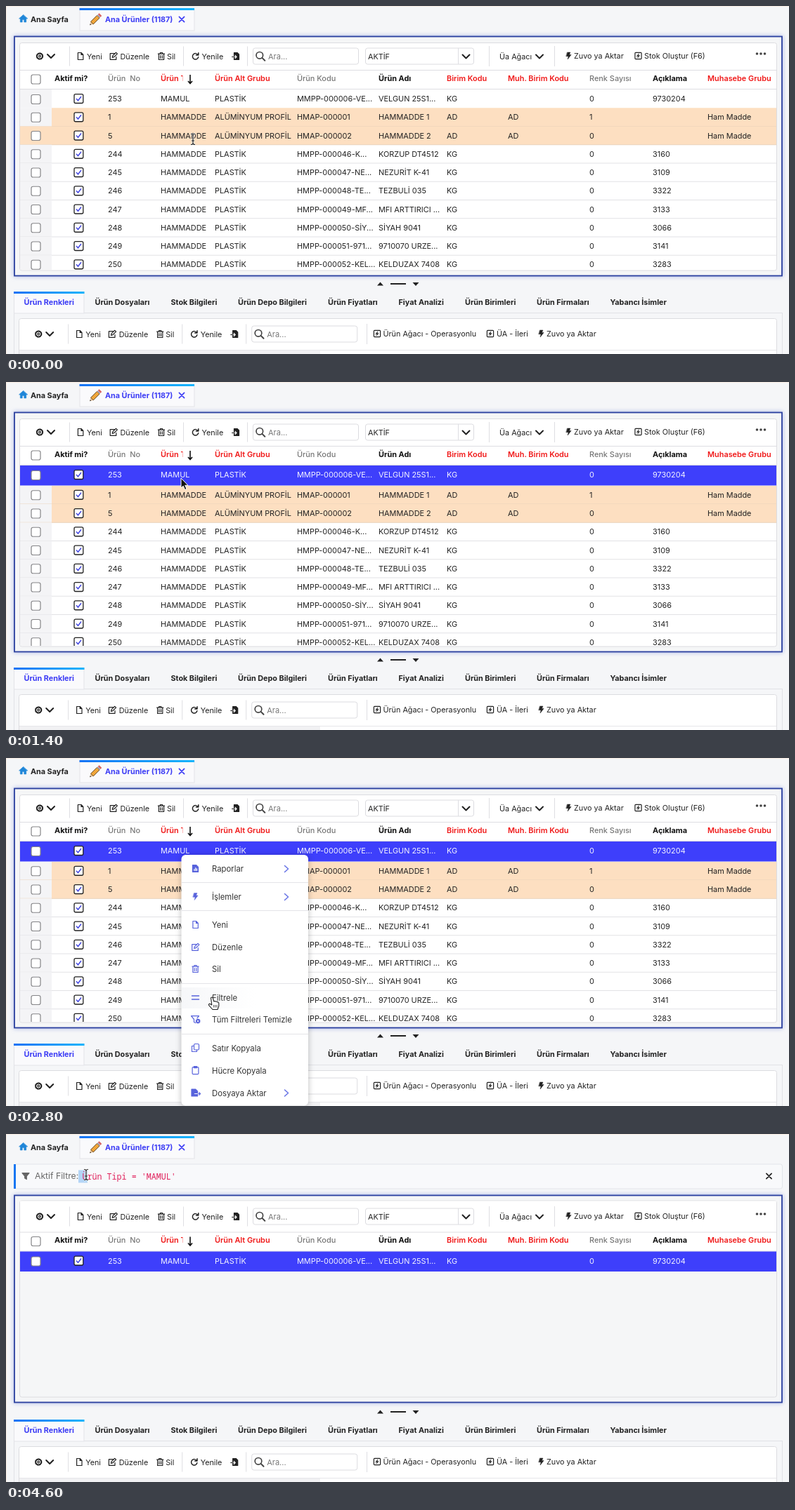
An HTML page that plays this animation: 1114x496 px, repeating every 4800 ms.

```html
<!DOCTYPE html>
<html lang="tr">
<head>
<meta charset="utf-8">
<title>Ana Ürünler</title>
<style>
html, body { margin: 0; width: 100%; height: 100%; overflow: hidden; background: #f5f6f8; }
svg { display: block; width: 1114px; height: 496px; }
text { font: 10.9px Inter, sans-serif; fill: #222; white-space: pre; }
.tb { font-size: 10.8px; }
.b { font-size: 10.8px; font-weight: 650; }
.hd { font-weight: 500; fill: #777; }
.red { font-weight: 600; fill: #f01818; }
.blk { font-weight: 650; fill: #111; }
.blue { fill: #3d3df5; }
.menu { font-size: 11.3px; fill: #333; }
.hint { font-size: 11px; fill: #777; }
.label { font-size: 12.2px; fill: #666; }
.mono { font: 11.7px "Noto Sans Mono", monospace; fill: #e0225c; }
.ic { fill: none; stroke: currentColor; stroke-width: 1.2; stroke-linecap: round; stroke-linejoin: round; }
.ic .f { fill: currentColor; }
.sep { stroke: #dedee2; }

.anim { animation: 4800ms step-end infinite; }
.full { animation-name: full; }
.filtered { animation-name: filtered; }
.tools { animation-name: tools; }
.head { animation-name: head; }
.rest { animation-name: rest; }
.row0 { animation-name: row0; }
.ink0 text { animation: ink0 4800ms step-end infinite; }
.side1 { animation-name: side1; }
.side5 { animation-name: side5; }
.popup { animation-name: popup; }
.hover { animation-name: hover; }
.mark { animation-name: mark; }
.pointer { animation-name: pointer; }
.arrow { animation-name: arrow; }
.hand { animation-name: hand; }
.beam { animation-name: beam; }
@keyframes full { 0% { visibility: visible } 66.666%, 100% { visibility: hidden } }
@keyframes filtered { 0% { visibility: hidden } 66.666%, 100% { visibility: visible } }
@keyframes tools { 0% { transform: none } 66.666%, 100% { transform: translate(0, 46px) } }
@keyframes head { 0% { transform: none } 66.666%, 100% { transform: translate(0, 48.5px) } }
@keyframes rest { 0% { transform: none } 29.166%, 100% { transform: translate(0, 2.5px) } }
@keyframes row0 {
  0% { fill: transparent; height: 26px }
  8.333% { fill: #e7e8ea; height: 26px }
  29.166%, 100% { fill: #3e3ffb; height: 28.5px }
}
@keyframes ink0 { 0% { fill: #222 } 29.166%, 100% { fill: #f4f4ff } }
@keyframes side1 { 0% { visibility: hidden } 4.166% { visibility: visible } 8.333%, 100% { visibility: hidden } }
@keyframes side5 { 0% { visibility: visible } 4.166%, 100% { visibility: hidden } }
@keyframes popup { 0% { visibility: hidden } 33.333% { visibility: visible } 66.666%, 100% { visibility: hidden } }
@keyframes hover {
  0% { transform: translate(0, -112px) }
  37.5% { transform: translate(0, -32px) }
  45.833% { transform: none }
  50% { transform: translate(0, 31px) }
  54.166%, 100% { transform: translate(0, 72px) }
}
@keyframes mark { 0% { visibility: hidden } 95.833%, 100% { visibility: visible } }
@keyframes pointer {
  0% { transform: translate(266px, 190px) }
  4.166% { transform: translate(258px, 160px) }
  8.333% { transform: translate(249px, 137px) }
  37.5% { transform: translate(266px, 242px) }
  45.833% { transform: translate(275px, 265px) }
  50% { transform: translate(281px, 297px) }
  54.166% { transform: translate(290px, 334px) }
  58.333% { transform: translate(293px, 341px) }
  66.666% { transform: translate(292px, 341px) }
  70.833% { transform: translate(250px, 258px) }
  75% { transform: translate(182px, 160px) }
  79.166% { transform: translate(130px, 95px) }
  83.333% { transform: translate(122px, 80px) }
  87.5% { transform: translate(117px, 71px) }
  91.666% { transform: translate(103px, 58px) }
  95.833%, 100% { transform: translate(114px, 58px) }
}
@keyframes arrow {
  0% { visibility: hidden } 8.333% { visibility: visible } 37.5% { visibility: hidden }
  66.666% { visibility: visible } 91.666%, 100% { visibility: hidden }
}
@keyframes hand { 0% { visibility: hidden } 37.5% { visibility: visible } 66.666%, 100% { visibility: hidden } }
@keyframes beam { 0% { visibility: visible } 8.333% { visibility: hidden } 91.666%, 100% { visibility: visible } }
</style>
</head>
<body>
<svg id="stage" viewBox="0 0 1114 496"></svg>
<script>
const icons = {
  gear: '<circle r="4.3" stroke-width="1.7" stroke-dasharray="2 1.38"/><circle r="3.7"/><circle r="1.4"/>',
  down: '<path d="M-5 -2.5 0 2.5 5 -2.5" stroke-width="2"/>',
  right: '<path d="M-2.5 -4.5 2.5 0 -2.5 4.5" stroke-width="1.6"/>',
  file: '<path d="M-3.6 -5H1L3.8 -2V5H-3.6ZM1 -5V-2H3.8"/>',
  edit: '<path d="M1 -3.8H-4.8V4.8H3.8V1M-1.8 1.8 -1.2 -.6 3.6 -5.2 5.4 -3.4 .6 1.2Z"/>',
  trash: '<path d="M-4.6 -3.4H4.6M-1.6 -3.4V-5H1.6V-3.4M-3.6 -3.4V5H3.6V-3.4M-1.3 -1V3M1.3 -1V3"/>',
  refresh: '<path d="M3.6 -2A4.2 4.2 0 1 0 4.2 1.2M4.3 -4.8V-1.6H1" stroke-width="1.5"/>',
  export: '<path class="f" d="M-2.5 -5H2L4.5 -2.5V5H-2.5Z"/><path d="M-5 1H1M-1 -1 1 1 -1 3" stroke="#fff"/><path d="M-5.4 1H-3"/>',
  search: '<circle cx="-1.2" cy="-1.2" r="4.8" stroke-width="1.7"/><path d="M2.4 2.4 6.3 6.3" stroke-width="2"/>',
  bolt: '<path class="f" d="M-1.8 -5H2.4L1 -1.5H3.6L-1.4 5 -.4 .7H-3.4Z" stroke-width=".5"/>',
  boltBox: '<rect x="-4.6" y="-4.6" width="9.2" height="9.2" rx="1"/><path class="f" d="M.8 -3 -2.2 .6H0L-.8 3 2.2 -.6H0Z" stroke-width=".5"/>',
  home: '<path class="f" d="M0 -5.4 -6 0H-4.2V5H-1.3V1.6H1.3V5H4.2V0H6Z" stroke-width=".6"/>',
  close: '<path d="M-3.6 -3.6 3.6 3.6M3.6 -3.6 -3.6 3.6" stroke-width="1.7"/>',
  funnel: '<path class="f" d="M-5 -4.4H5L1.3 .2V4.6L-1.3 3V.2Z"/>',
  report: '<path class="f" d="M-4 -5H1L4 -2V5H-4Z"/><path d="M-1.6 3V1M.2 3V-1M2 3V.4" stroke="#fff"/>',
  equals: '<path d="M-5 -2.6H5M-5 2.6H5" stroke-width="1.5"/>',
  unfilter: '<path d="M5 -4.8H-6L-2 0V4L0 5M5 -4.8 2.4 -1.6"/><circle class="f" cx="3.6" cy="2.6" r="2.7"/><path d="M2.6 1.6 4.6 3.6M4.6 1.6 2.6 3.6" stroke="#fff" stroke-width=".9"/>',
  copy: '<rect x="-2" y="-5.5" width="7" height="8.5" rx="1.5"/><path d="M-2 -2.5H-5V5.5H2V3"/>',
  paste: '<rect x="-4.4" y="-4.4" width="8.8" height="10" rx="1.2"/><path d="M-2 -5.4H2V-3.4H-2Z"/>',
  send: '<path class="f" d="M-5.5 -5H0L3 -2V5H-5.5Z"/><path d="M-1 1.5H2.8" stroke="#fff"/><path d="M4 1.5H7M5.2 -.4 7 1.5 5.2 3.4"/>'
};
const icon = (name, x, y, color = '#222') =>
  `<g class="ic" color="${color}" transform="translate(${x} ${y})">${icons[name]}</g>`;
const text = (x, y, s, cls = '') => `<text x="${x}" y="${y + 4}" class="${cls}">${s}</text>`;
const rect = (x, y, w, h, fill, more = '') =>
  `<rect x="${x}" y="${y}" width="${w}" height="${h}" fill="${fill}" ${more}/>`;
const line = (d, color = '#dedee2') => `<path d="${d}" fill="none" stroke="${color}"/>`;
const group = (cls, ...parts) => `<g class="${cls}">${parts.join('')}</g>`;
const box = (x, y, w, h, fill = '#fff', color = '#dcdce0') => rect(x, y, w, h, fill, `stroke="${color}" rx="3"`);
const emptyBox = y => rect(36, y - 6, 13, 13, '#fff', 'stroke="#858588" stroke-width="1.2" rx="2.5"');
const tickBox = y => rect(97, y - 6.3, 12.8, 12.8, '#fff', 'stroke="#222" stroke-width="1.3" rx="2"') +
  `<path d="M100 ${y} 102.5 ${y + 2.8} 107 ${y - 3}" fill="none" stroke="#3f43e0" stroke-width="1.4"/>`;

// Buttons shared by both toolbars
const buttons = (dx, y) => icon('gear', 48 + dx, y) + icon('down', 64 + dx, y) +
  icon('file', 106 + dx, y) + text(115 + dx, y, 'Yeni', 'tb') +
  icon('edit', 153 + dx, y) + text(162.5 + dx, y, 'Düzenle', 'tb') +
  icon('trash', 221 + dx, y) + text(229 + dx, y, 'Sil', 'tb') +
  icon('refresh', 269.5 + dx, y) + text(278.5 + dx, y, 'Yenile', 'tb') +
  icon('export', 327 + dx, y) +
  [90.5, 252.5, 343.5].map(x => line(`M${x + dx} ${y - 14}V${y + 14}`)).join('') +
  box(351.5 + dx, y - 11.5, 150, 23) + icon('search', 362 + dx, y, '#444') + text(373 + dx, y, 'Ara...', 'hint');

const frame = (y, h) =>
  rect(12, y, 1092, h, '#f5f6f7', 'stroke="#2b409f" stroke-width="1.8" style="filter:drop-shadow(0 0 3px #6f86d899)"');

const columns = [
  [69, 'Aktif mi?', 'blk'], [145, 'Ürün\u00a0 No', 'hd'], [297, 'Ürün Alt Grubu', 'red'], [414, 'Ürün Kodu', 'hd'],
  [530, 'Ürün Adı', 'blk'], [627, 'Birim Kodu', 'red'], [714, 'Muh. Birim Kodu', 'red'],
  [830, 'Renk Sayısı', 'hd'], [920, 'Açıklama', 'blk'], [998, 'Muhasebe Grubu', 'red']
];
const fields = [145, 220, 297, 414, 530, 627, 830, 920];
const plastic = (no, code, name, note, type = 'HAMMADDE') => [no, type, 'PLASTİK', code, name, 'KG', 0, note];
const alloy = (no, n, colors) => [no, 'HAMMADDE', 'ALÜMİNYUM PROFİL', 'HMAP-00000' + n, 'HAMMADDE ' + n, 'AD', colors, ''];
const rows = [
  plastic(253, 'MMPP-000006-VE...', 'VELGUN 25S1...', 9730204, 'MAMUL'),
  alloy(1, 1, 1),
  alloy(5, 2, 0),
  plastic(244, 'HMPP-000046-K...', 'KORZUP DT4512', 3160),
  plastic(245, 'HMPP-000047-NE...', 'NEZURİT K-41', 3109),
  plastic(246, 'HMPP-000048-TE...', 'TEZBULİ 035', 3322),
  plastic(247, 'HMPP-000049-MF...', 'MFI ARTTIRICI ...', 3133),
  plastic(248, 'HMPP-000050-SİY...', 'SİYAH 9041', 3066),
  plastic(249, 'HMPP-000051-971...', '9710070 URZE...', 3141),
  plastic(250, 'HMPP-000052-KEL...', 'KELDUZAX 7408', 3283)
];
const pitch = 26.25;
const cells = (row, y) => row.map((v, i) => text(fields[i], y, v)).join('');

const drawRow = (row, i) => {
  const y = 132 + pitch * i, top = y - 13;
  const tinted = i === 1 || i === 2;
  return (tinted ? rect(65, top, 1031, pitch, '#fddfc1') : '') +
    rect(20, top, 45, pitch, '#f4f4f6') +
    (tinted ? rect(20, top, 45, pitch, '#fddfc1', `class="anim side${row[0]}"`) : '') +
    line(`M20 ${top + pitch}H1096`, tinted ? '#e9d2ba' : '#e2e2e5') +
    emptyBox(y) + tickBox(y) + cells(row, y) +
    (tinted ? text(714, y, 'AD') + text(998, y, 'Ham Madde') : '');
};

const tabs = [[126.5, 'Ürün Dosyaları'], [234.5, 'Stok Bilgileri'], [330, 'Ürün Depo Bilgileri'], [458, 'Ürün Fiyatları'],
  [558.5, 'Fiyat Analizi'], [653, 'Ürün Birimleri'], [755, 'Ürün Firmaları'], [859.5, 'Yabancı İsimler']];

const menu = [[158, 'report', 'Raporlar', 1], [198, 'bolt', 'İşlemler', 1], [238, 'file', 'Yeni'], [270, 'edit', 'Düzenle'],
  [301, 'trash', 'Sil'], [342, 'equals', 'Filtrele'], [373, 'unfilter', 'Tüm Filtreleri Temizle'],
  [413.5, 'copy', 'Satır Kopyala'], [445.5, 'paste', 'Hücre Kopyala'], [477.5, 'send', 'Dosyaya Aktar', 1]];

const defs = `<defs>
  <linearGradient id="bar"><stop stop-color="#1673f5"/><stop offset="1" stop-color="#16b4fb"/></linearGradient>
  <linearGradient id="fade"><stop stop-color="#f6f7f9"/><stop offset="1" stop-color="#fff"/></linearGradient>
  <clipPath id="body"><rect x="20" y="119" width="1076" height="257"/></clipPath>
  <clipPath id="type"><rect x="215" y="90" width="36.5" height="26"/></clipPath>
</defs>`;

const topTabs = rect(0, 0, 1114, 496, '#f5f6f8') + line('M0 .5H1114M.5 0V496', '#f8ece2') +
  icon('home', 24.5, 18, '#1f86d8') + text(35, 18.5, 'Ana Sayfa', 'b') +
  rect(105, 4, 163, 31, '#fafafc', 'stroke="#e3e3e8"') + rect(104.5, 3, 163.5, 3, 'url(#bar)') +
  `<g transform="translate(127 19.5) rotate(-45)"><path d="M-11 0 -6.5 -2.6V2.6Z" fill="#e8c49a"/>
   <path d="M-11 0-9.2 -1V1Z" fill="#222"/><path d="M-6.5 -2.6H6V2.6H-6.5Z" fill="#f0a63a" stroke="#4a3217" stroke-width=".8"/>
   <path d="M6 -2.6H8V2.6H6Z" fill="#aab"/><path d="M8 -2.6H10.5V2.6H8Z" fill="#d9635f"/></g>` +
  text(141, 19, 'Ana Ürünler (1187)', 'b blue') + icon('close', 250, 19, '#3d3df5');

const fullPanel = group('anim full', frame(43.5, 341), box(19.5, 52.5, 1077, 324.5));
const slimPanel = group('anim filtered',
  box(11.5, 43, 1093, 35, '#f8f9fb', '#e2e5ea'), rect(11, 43, 3, 35, '#1677f2'),
  icon('funnel', 28, 60, '#666'),
  rect(103, 51.5, 13, 18, '#b4d5f6', 'class="anim mark"'),
  text(41, 60, 'Aktif Filtre:', 'label'), text(108.5, 60.5, "Ürün Tipi = 'MAMUL'", 'mono'),
  icon('close', 1085.5, 60, '#222'),
  frame(87.5, 295), box(19.5, 95, 1077, 280, '#f5f6f7'), rect(20, 95.5, 1076, 72, '#fff'));

const tools = group('anim tools', buttons(0, 71.5),
  box(511.5, 60, 154, 23), line('M643.5 60V83'), text(515, 71.5, 'AKTİF', 'tb'), icon('down', 654.5, 72),
  line('M687.5 57V86M780.5 57V86'),
  text(702, 71.5, 'Üa Ağacı', 'tb'), icon('down', 759, 72),
  icon('bolt', 800.5, 71), text(808, 71, 'Zuvo ya Aktar', 'tb'),
  icon('boltBox', 899.5, 71), text(908, 71, 'Stok Oluştur (F6)', 'tb'),
  [1068.5, 1074, 1079.5].map(x => `<circle cx="${x}" cy="68" r="1.8" fill="#444"/>`).join(''));

const rest = group('anim full', `<g clip-path="url(#body)">${group('anim rest', rows.map((r, i) => i ? drawRow(r, i) : '').join(''))}</g>`);

const head = group('anim head',
  line('M20 91.5H1096M20 118.5H1096'), emptyBox(104),
  columns.map(([x, s, cls]) => text(x, 102.5, s, cls)).join(''),
  `<g clip-path="url(#type)">${text(220, 102.5, 'Ürün Tipi', 'red')}</g>`,
  '<path d="M262 98V110M259 107 262 110.5 265 107" fill="none" stroke="#111" stroke-width="1.6"/>',
  rect(20, 119, 45, 26, '#f4f4f6', 'class="anim full"'),
  rect(20, 119, 1076, 26, 'none', 'class="anim row0"'),
  emptyBox(132.5), tickBox(132), group('ink0', cells(rows[0], 132)));

const splitter = '<path d="M528 398.5H537L532.5 393.5ZM578.500 394H587.5L583 399Z" fill="#222"/>' +
  line('M547 396H569', '#222').replace('/>', ' stroke-width="2"/>');

const bottom = line('M11 437.500H1105M11.5 437V496M1104.5 437V496', '#e1e2e7') +
  rect(11.5, 407.5, 99.5, 30.5, '#fafafc', 'stroke="#e3e3e8"') + rect(11, 407, 100.5, 3, 'url(#bar)') +
  text(25.5, 422, 'Ürün Renkleri', 'b blue') + tabs.map(([x, s]) => text(x, 422, s, 'b')).join('') +
  box(18.5, 445.5, 1078, 60) + rect(19, 491, 428, 5, '#f1f1f3') + line('M19 490.5H1096', '#e6e6ea') +
  buttons(-1.8, 467.5) + line('M513.5 453V482') +
  icon('boltBox', 528, 467) + text(536.5, 467, 'Ürün Ağacı - Operasyonlu', 'tb') +
  icon('boltBox', 689, 467) + text(698, 467, 'ÜA - İleri', 'tb') +
  icon('bolt', 761.5, 467) + text(769, 467, 'Zuvo ya Aktar', 'tb');

const popup = group('anim popup',
  rect(249.5, 138, 180.5, 357.5, '#fff', 'rx="6" style="filter:drop-shadow(0 1px 4px #0004)"'),
  rect(250, 255, 105, 30, 'url(#fade)', 'class="anim hover"'),
  line('M250 177.500H430M250 217.500H430M250 321.500H430M250 393.500H430', '#e4e4e8'),
  menu.map(([y, name, s, sub]) => icon(name, 269.5, y - .5, '#5863dc') + text(293, y, s, 'menu') +
    (sub ? icon('right', 399, y, '#6a76e6') : '')).join(''));

const pointer = group('anim pointer',
  '<path class="anim arrow" d="M0 0V14L3.2 11.200 5.600 16.500 8 15.400 5.700 10.300H10Z" fill="#111" stroke="#fff" stroke-width="1"/>',
  `<g class="anim hand" fill="#fff" stroke="#222" stroke-width="1.1" stroke-linejoin="round">
   <path d="M-1.500 .800Q0 -.8 1.300 .9L2.800 6Q4.300 4.800 5.300 6.300Q7 5.300 7.800 7Q9.600 6.500 9.800 8.500V12.500L8 17.500H1L-4.400 11.300Q-5 9.300 -3 9.300L-.2 11Z"/>
   <path d="M2.600 11V14.500M4.800 11V14.500M7 11V14.500" stroke-width=".8"/></g>`,
  `<g class="anim beam" fill="none"><path d="M-3 -7.500Q0 -7.500 0 -5.500Q0 -7.500 3 -7.500M0 -6V6M-3 7.500Q0 7.500 0 5.500Q0 7.500 3 7.500M-2 2H2" stroke="#fff" stroke-width="2.600"/>
   <path d="M-3 -7.500Q0 -7.500 0 -5.500Q0 -7.500 3 -7.500M0 -6V6M-3 7.500Q0 7.500 0 5.500Q0 7.500 3 7.500M-2 2H2" stroke="#222" stroke-width="1.200"/></g>`);

document.getElementById('stage').innerHTML =
  defs + topTabs + fullPanel + slimPanel + tools + rest + head + splitter + bottom + popup + pointer;
</script>
</body>
</html>
```
